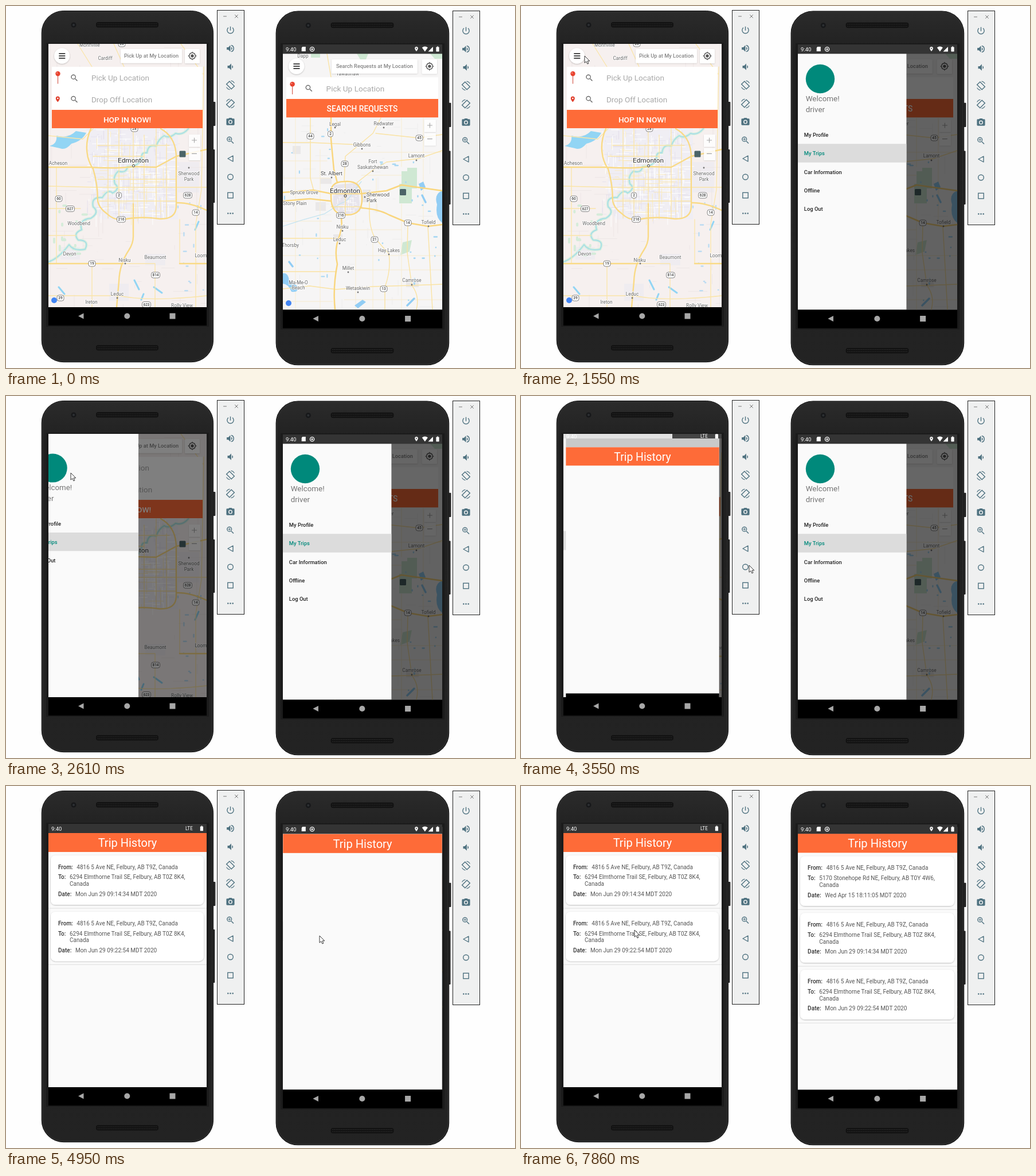
An HTML page for the animation above (7.99 s loop, 888 by 631 pixels).

```html
<!DOCTYPE html>
<html lang="en">
<head>
<meta charset="utf-8">
<title>Ride app: trip history</title>
<style>
html, body { margin: 0; width: 100%; height: 100%; overflow: hidden; background: #fefefe; }
svg { display: block; width: 888px; height: 631px; }
text { font-family: Roboto, "Open Sans", sans-serif; white-space: pre; }
.halo { paint-order: stroke; stroke: #fff; stroke-opacity: .8; stroke-width: 2px; stroke-linejoin: round; }
.road { fill: none; stroke-linejoin: round; stroke-linecap: round; }
</style>
</head>
<body>
<svg id="stage" viewBox="0 0 888 631" xmlns="http://www.w3.org/2000/svg"></svg>
<script>
const ORANGE = '#fe6b38', TEAL = '#00897b', STEEL = '#4f7280';
const RIGHT = 'translate(408.44 .5) scale(1.0075)';
const UNDO_RIGHT = 'scale(.99256) translate(-408.44 -.5)';
const LOOP = 7990;

// ---------- drawing helpers ----------
const text = (x, y, s, size, fill, more = '') =>
  `<text x="${x}" y="${y}" font-size="${size}" fill="${fill}" ${more}>${s}</text>`;
const mid = 'text-anchor="middle"';
const rect = (x, y, w, h, fill, more = '') =>
  `<rect x="${x}" y="${y}" width="${w}" height="${h}" fill="${fill}" ${more}/>`;
const disc = (x, y, r, fill, more = '') => `<circle cx="${x}" cy="${y}" r="${r}" fill="${fill}" ${more}/>`;
const line = (d, color, w, more = '') =>
  `<path class="road" d="${d}" stroke="${color}" stroke-width="${w}" ${more}/>`;
const shape = (d, fill) => `<path d="${d}" fill="${fill}"/>`;
const icon = (name, x, y, size, fill) =>
  `<path transform="translate(${x - size / 2} ${y - size / 2}) scale(${size / 24})" d="${ICONS[name]}" fill="${fill}"/>`;

const ICONS = {
  power: 'M13 3h-2v10h2V3zm4.8 2.2l-1.4 1.4A7 7 0 1 1 7.6 6.6L6.2 5.2a9 9 0 1 0 11.6 0z',
  louder: 'M3 9v6h4l5 5V4L7 9H3zm13.5 3c0-1.8-1-3.3-2.5-4v8c1.5-.7 2.5-2.2 2.5-4zM14 3.2v2.1a7 7 0 0 1 0 13.4v2.1a9 9 0 0 0 0-17.6z',
  quieter: 'M18.5 12c0-1.8-1-3.3-2.5-4v8c1.5-.7 2.5-2.2 2.5-4zM5 9v6h4l5 5V4L9 9H5z',
  camera: 'M9 2L7.2 4H4a2 2 0 0 0-2 2v12a2 2 0 0 0 2 2h16a2 2 0 0 0 2-2V6a2 2 0 0 0-2-2h-3.2L15 2H9zm3 15a5 5 0 1 1 0-10 5 5 0 0 1 0 10zm0-2a3 3 0 1 0 0-6 3 3 0 0 0 0 6z',
  search: 'M15.5 14h-.8l-.3-.3A6.5 6.5 0 1 0 9.5 16c1.6 0 3.1-.6 4.2-1.6l.3.3v.8l5 5 1.5-1.5-5-5zm-6 0a4.5 4.5 0 1 1 0-9 4.5 4.5 0 0 1 0 9z',
  target: 'M12 8a4 4 0 1 0 0 8 4 4 0 0 0 0-8zm8.9 3A9 9 0 0 0 13 3.1V1h-2v2.1A9 9 0 0 0 3.1 11H1v2h2.1a9 9 0 0 0 7.9 7.9V23h2v-2.1a9 9 0 0 0 7.9-7.9H23v-2h-2.1zM12 19a7 7 0 1 1 0-14 7 7 0 0 1 0 14z',
  place: 'M12 2a7 7 0 0 0-7 7c0 5.3 7 13 7 13s7-7.7 7-13a7 7 0 0 0-7-7zm0 9.5a2.5 2.5 0 1 1 0-5 2.5 2.5 0 0 1 0 5z'
};

const label = ([s, x, y, size = 8.3, color = '#696969']) =>
  text(x, y, s, size, color, `class="halo" ${mid}`);
const shield = ([s, x, y]) => {
  const w = 6 + s.length * 3;
  return rect(x - w / 2, y - 5, w, 10, '#fff', 'rx="3.5" stroke="#777" stroke-width=".9"') +
    text(x, y + 2.4, s, 6.5, '#444', `font-weight="500" ${mid}`);
};

// short random streets inside a box
function streets(x, y, w, h, count, longest, seed) {
  const rnd = () => (seed = seed * 16807 % 2147483647) / 2147483647;
  let d = '';
  for (let i = 0; i < count; i++)
    d += `M${(x + rnd() * w).toFixed(1)} ${(y + rnd() * h).toFixed(1)}${i % 2 ? 'h' : 'v'}${(rnd() * longest).toFixed(1)}`;
  return d;
}

// ---------- maps ----------
function cityMap() {
  const major = 'M148 214Q140 232 141 250Q142 270 152 284Q160 310 160 340Q162 352 176 362Q188 374 205 372Q235 366 268 371Q296 372 297 350V262Q296 228 270 214' +
    'M222 345V402Q222 414 214 426Q198 450 197 480L193 525M74 281H146Q190 284 222 280L262 281L297 262L350 250' +
    'M297 343Q320 342 350 356M74 449H204M303 449H350';
  const minor = 'M88 281V449M74 314L158 316H350M74 353H130M345 106L341 320L331 380V525M260 449V525M74 505H197M197 505Q250 516 350 505' +
    'M160 243H285M152 262H240M160 302H297M163 340H297M178 214V370M197 214V370M222 214V345M241 225V371M262 214V371M280 240V371' +
    'M125 66L150 106M188 66L206 106M152 214L134 232L74 226M305 66L345 120M150 449V525M303 372V449M74 400H122M204 449H260';
  const river = 'M318 214Q308 226 296 222Q284 232 276 226Q266 232 262 244Q248 240 246 256Q234 254 237 268Q226 282 212 280Q210 292 196 288Q186 296 190 310' +
    'Q200 318 186 326Q178 318 168 334Q148 332 152 350Q164 360 148 370Q126 372 132 390Q116 396 126 408Q146 408 138 424Q118 428 110 416Q92 440 74 446';
  return rect(74, 66, 276, 459, '#f6f0ef') +
    shape('M140 214H300V372H165Q148 340 152 300Z', '#f0eef4') +
    shape('M300 272H337V325H300ZM95 420h34v22h-34zM180 484h34v30h-34zM243 432h35v20h-35z', '#efecf0') +
    line(streets(76, 66, 270, 455, 80, 45, 11), '#ede6e6', .9) +
    line(streets(142, 214, 145, 150, 170, 26, 7), '#e2dfec', .8) +
    line(streets(142, 214, 145, 150, 170, 30, 23), '#fff', 1) +
    line(streets(150, 214, 140, 150, 50, 36, 57), '#fbecc0', 1) +
    line(river, '#dcefe0', 5) + line(streets(300, 335, 45, 180, 14, 6, 31), '#bcdcf2', 2.4) +
    line(streets(84, 340, 60, 100, 16, 8, 5), '#d5ecd9', 4) +
    line(river, '#a6dee6', 1.9) +
    shape('M76 244Q90 240 88 226Q108 232 122 218L140 221Q132 236 114 240Q104 252 94 248Z', '#92d5f4') +
    line('M224 478L232 494M258 490L272 500M92 490L102 502M336 376L330 390M240 502L236 512', '#92d5f4', 3) +
    line(minor, '#fae5a9', 1.3) + line(major, '#f9da86', 2.4) +
    rect(302.5, 252.5, 11, 11, '#4b6468', 'rx="1.5"') +
    [['Morinville', 146, 71], ['Cardiff', 173, 93.5], ['Acheson', 91, 276.5], ['Sherwood', 319, 295], ['Park', 319, 305],
      ['Woodbend', 127, 381.5], ['Devon', 111, 434.5], ['Nisku', 207, 445.5], ['Beaumont', 260.5, 440.5], ['Loom', 340, 437.5],
      ['Leduc', 194, 505], ['Ireton', 149, 518.5], ['Rolly View', 307, 524.5], ['Edmonton', 222, 272.5, 11.8, '#333']].map(label).join('') +
    disc(222.5, 278.5, 2, '#fff', 'stroke="#333"') + disc(319, 282, 1.4, '#777') + disc(208, 449, 1.4, '#777') + disc(194, 509, 1.4, '#777') +
    [['60', 92, 336], ['627', 112, 353.5], ['216', 201, 372], ['2', 197, 330], ['628', 317, 330], ['14', 331, 360], ['19', 150, 449],
      ['814', 261, 469], ['623', 245, 520.5], ['39', 95, 509], ['28', 224, 214], ['28', 202, 66]].map(shield).join('') +
    disc(84, 513, 5, '#4285f4');
}

function regionMap() {
  const major = 'M567 330Q564 306 590 306Q621 303 621 335Q622 364 596 364Q566 366 567 330Z' +
    'M483 325L536 321L567 327H621L664 322L690 312L761 322M483 340L530 336L567 340M567 195V232L572 285L578 308' +
    'M584 364Q588 382 582 400Q572 424 578 450Q570 490 574 529M620 352Q650 354 668 364L701 378L736 384L761 381';
  const minor = 'M590 306L592 262L640 222L654 195M612 308L640 286L664 272L720 266L761 252M634 322V362Q634 385 643 404L668 432Q672 460 661 490V529' +
    'M483 405H582M483 493L530 488L576 494L640 489L708 487L761 485M531 195V300L538 326M708 487Q722 505 716 529M708 487L700 430L701 378' +
    'M483 238H531L620 242M645 222L720 230L761 224M592 306V364M567 350H621M483 463H577M736 384L744 529M560 83L567 124';
  const thin = 'M505 195V529M548 250V529M610 364V529M640 404V529M690 195V280M690 345V529M728 195V380M483 270H560M600 255H761' +
    'M483 300H565M620 295H690M483 375H568M600 390H690M483 435H761M590 460H761M590 512H761M483 515H570M646 300V360';
  return rect(483, 83, 278, 447, '#f6f5f5') +
    shape('M572 312L614 308L618 358L590 364L570 352Z', '#e8e5ec') +
    shape('M540 342h18v15h-18zM622 320h14v22h-14zM548 300h20v10h-20zM500 244h14v14h-14zM571 398h16v12h-16zM698 478h22v12h-22z', '#eae8e8') +
    shape('M690 288H700V282H717V318H708V344H686V310H690ZM692 412L708 408L704 428L688 434ZM532 83H548V90H532ZM612 83H632L628 93H618ZM740 83H761V92H748Z', '#cfe8d3') +
    line(thin, '#f7ecd0', 1) + line(streets(484, 195, 265, 330, 55, 30, 17), '#ededec', .9) +
    line(streets(573, 312, 40, 45, 40, 12, 9), '#fff', .9) +
    line(streets(640, 270, 110, 250, 22, 5, 77), '#a9d8f3', 2.6) + line(streets(486, 210, 80, 310, 14, 5, 41), '#a9d8f3', 2.2) +
    line('M620 306L604 326Q598 340 584 344Q572 352 556 362L520 372L483 384', '#c4e4f0', 1.3) +
    shape('M761 322Q746 328 752 346Q748 368 761 378ZM483 466Q492 464 494 478L508 488Q512 500 498 498Q492 484 483 484ZM608 522L622 512L628 516L614 527ZM720 310l8-4 4 10-8 6z', '#92cdf4') +
    line('M700 522L712 510M726 330L732 342M500 454L494 446', '#92cdf4', 3.4) +
    line(minor, '#fae3a3', 1.4) + line(major, '#f9d67e', 2.5) +
    rect(687, 319, 11, 11, '#4b6468', 'rx="1.5"') +
    [['Dapp', 518, 89.5], ['Tawatinaw', 596, 121], ['Legal', 574, 208.5], ['Redwater', 659, 207.5], ['Gibbons', 621, 244.5], ['Fort', 640, 274],
      ['Saskatchewan', 640, 283.5], ['Lamont', 716, 264], ['St. Albert', 568, 294.5, 9.2, '#444'], ['Edmonton', 591.5, 325.5, 11.6, '#333'],
      ['Spruce Grove', 520, 328], ['Stony Plain', 504, 347], ['Sherwood', 649, 332, 9, '#555'], ['Park', 638, 342, 9, '#555'], ['Nisku', 587, 388],
      ['Leduc', 582, 409.5], ['Tofield', 737, 379.5], ['Thorsby', 496, 420], ['Hay Lakes', 668, 429], ['Millet', 597, 460],
      ['Ma-Me-O', 510, 485], ['Beach', 510, 494], ['Wetaskiwin', 614, 495], ['Camrose', 708, 481]].map(label).join('') +
    disc(592, 331, 2, '#fff', 'stroke="#333"') +
    [[574, 212], [659, 212], [621, 249], [640, 288], [716, 269], [568, 299], [626, 333], [587, 392], [582, 414], [737, 384], [668, 433], [597, 464],
      [614, 499], [708, 486]].map(([x, y]) => disc(x, y, 1.4, '#777')).join('') +
    [['44', 531, 227], ['2', 566, 223], ['28', 591, 275], ['45', 721, 230], ['216', 584, 365], ['21', 643, 407], ['14', 701, 378], ['13', 659, 493]].map(shield).join('') +
    disc(493, 518, 5, '#4285f4');
}

// ---------- app screens ----------
function mapControls({ dy, dx, boxX, request, fields, action, actionY, zoomY }) {
  const y = 87 + dy, top = 75 + dy;
  const field = (s, fy) => icon('search', 119.3, fy, 16, '#666') + text(149, fy + 5, s, 13.5, '#a9a9a9');
  const py = 118 + dy;
  return rect(boxX, top, 307 - boxX, 24.5, '#fff', 'rx="1.5" filter="url(#faint)"') +
    text((boxX + 307) / 2, y + 3.2, request, 9.25, '#858585', `font-weight="500" ${mid}`) +
    rect(312 + dx, top, 26, 25, '#fff', 'rx="1.5" filter="url(#faint)"') + icon('target', 325 + dx, y, 16, '#555') +
    disc(97.6, y, 13.5, '#fff', 'filter="url(#soft)"') +
    line(`M92.3 ${y - 4}h11M92.3 ${y}h11M92.3 ${y + 4}h11`, '#111', 1.5, 'style="stroke-linecap:butt"') +
    rect(80, 106 + dy, 263, actionY - 106 - dy, '#fff') +
    line(`M90.5 ${py}v17`, '#d9695c', 1.3) + disc(90.5, py, 4.2, '#e8432f') + disc(89.2, py - 1.3, 1, '#f6a79c') +
    field('Pick Up Location', 125.3 + dy) +
    (fields > 1 ? icon('place', 90.3, 162.5, 12, '#e0402e') + field('Drop Off Location', 162.8) : '') +
    rect(80, actionY, 263, 32, ORANGE) +
    text(211.5, actionY + 21.7, action, 13.7, '#fff', `font-weight="500" ${mid}`) +
    [0, 1].map(i => rect(319, zoomY - 10 + i * 23.4, 20, 21.5, '#fff', 'opacity=".85" filter="url(#faint)"')).join('') +
    line(`M324.5 ${zoomY}h8M328.5 ${zoomY - 4}v8M324.5 ${zoomY + 23.4}h8`, '#a5a5a5', 1.1);
}

function drawer(user, items) {
  return rect(74, 66, 188, 459, '#fafafa') + disc(112.7, 125.6, 25, TEAL) +
    text(87.6, 164.4, 'Welcome!', 13.3, '#757575') + text(87.6, 182.8, user, 13.3, '#757575') +
    rect(74, 238, 188, 32.2, '#dcdcdc') +
    items.map((s, i) => text(84.8, 225.5 + i * 32.2, s, 9.3, i === 1 ? TEAL : '#222', 'font-weight="500"')).join('');
}

const HOME = '4816 5 Ave NE, Felbury, AB T9Z, Canada';
const TRAIL = '6294 Elmthorne Trail SE, Felbury, AB T0Z 8K4,';
const STONE = '5170 Stonehope Rd NE, Felbury, AB T0Y 4W6,';

function card([to, date], i) {
  const y = 121 + i * 98.2;
  const row = (name, x, dy, value) =>
    text(91, y + dy, name, 10, '#333', 'font-weight="500"') + text(x, y + dy, value, 10, '#555');
  return rect(78, y, 267, 86, '#fff', 'rx="8" filter="url(#soft)"') +
    row('From:', 123.3, 23.6, HOME) + row('To:', 111, 41.3, to) + text(111, y + 53, 'Canada', 10, '#555') +
    row('Date:', 121, 70.6, date) + rect(74, y + 91.6, 276, 1, '#dedede');
}

const battery = rect(338.8, 70.5, 5.2, 7.8, '#fff', 'rx=".6"') + rect(340.3, 69.4, 2.2, 1.2, '#fff');
const clock = text(79, 77.6, '9:40', 9.5, '#fff');
const network = text(313, 77.2, 'LTE', 8.2, '#fff');
const lteStatus = rect(74, 66, 276, 16, '#343434') + clock + network + battery;
const fullStatus = rect(74, 66, 276, 16.2, '#343434') + clock +
  shape('M108 70h5.5v8h-7v-6z', '#fff') +
  disc(124.7, 74.2, 3.6, 'none', 'stroke="#fff" stroke-width="1.3"') + disc(124.7, 74.2, 1.5, '#fff') +
  icon('place', 305.3, 74, 9.5, '#fff') + shape('M315 71.5Q320 67.5 325 71.5L320 78.5Z', '#fff') +
  shape('M334 70v8.4h-8.4z', '#fff') + `<g transform="translate(.6)">${battery}</g>`;

function tripsPage(trips, id) {
  return rect(74, 66, 276, 491, '#fafafa') + rect(74, 66, 276, 16, '#c9c9c9') + rect(74, 82, 276, 33, ORANGE) +
    text(212, 106, 'Trip History', 20, '#fff', mid) +
    `<g id="${id}Cards">${trips.map(card).join('')}</g>` + rect(74, 525, 276, 32, '#000');
}

function phone(id, place, { map, user, items, trips, status }) {
  const grill = y => rect(157, y, 109, 9.5, '#121212', 'rx="4"') +
    line(`M160 ${y + 3}H263M160 ${y + 6.5}H263`, '#2e2e2e', 1.2, 'stroke-dasharray="1 2"');
  return `<g transform="${place}">` +
    rect(360, 167, 5.4, 42, '#2a2a2a', 'rx="1"') + rect(359, 250, 5.4, 93, '#2a2a2a', 'rx="1"') +
    rect(62.2, 8.5, 299.4, 612.2, 'url(#shell)', 'rx="38" stroke="#161616"') +
    rect(64, 10.3, 295.8, 608.6, 'none', 'rx="36" stroke="#303030" stroke-width="1"') +
    rect(70, 64, 284, 495, '#1b1b1b') +
    disc(118, 33, 4.5, '#17181a') + disc(118, 33, 2, '#2d3033') + grill(28) + grill(591) +
    `<g clip-path="url(#screen)"><g id="${id}Old">${map}<rect id="${id}Dim" x="74" y="66" width="276" height="459"/>` +
    `<g id="${id}Drawer">${drawer(user, items)}</g></g><g id="${id}New">${tripsPage(trips, id)}</g>${status}</g>` +
    rect(74, 525, 276, 32, '#000') + shape('M126 540.5L135.5 535.5V545.5Z', '#a8a8a8') + disc(211.3, 540.5, 5, '#a8a8a8') +
    rect(285.5, 535.5, 10, 10, '#a8a8a8') + '</g>';
}

function toolbar(place) {
  const x = 391.5;
  const names = ['power', 'louder', 'quieter', '', '', 'camera', 'search'];
  const outline = `stroke="${STEEL}" stroke-width="1.4"`;
  const turn = (y, s) => `<g transform="translate(${x} ${y}) scale(${s} 1)">` +
    rect(-3.7, -6, 7.4, 12, 'none', `transform="rotate(-45)" ${outline}`) +
    line('M1.5 -7.6Q5 -7 6.6 -4M-1.5 7.6Q-5 7 -6.6 4', STEEL, 1.2) + '</g>';
  return `<g transform="${place}">` + rect(368.5, 7.5, 47, 373, '#eff0f0', 'stroke="#222"') +
    line('M379.5 18h5M399.5 15.5l5 5m0-5l-5 5', '#777', 1) +
    names.map((n, i) => n && icon(n, x, 42 + i * 32, 17, STEEL)).join('') + turn(138, 1) + turn(170, -1) +
    line('M387.8 232.2h4m-2-2v4', STEEL, 1) +
    line('M387 266L396 261V271Z', STEEL, 1.4) + disc(x, 298, 4.8, 'none', outline) +
    rect(386.8, 325.3, 9.4, 9.4, 'none', outline) +
    [-4.2, 0, 4.2].map(d => disc(x + d, 361.5, 1.3, STEEL)).join('') + '</g>';
}

const shadow = (id, opacity) => `<filter id="${id}" x="-20%" y="-20%" width="140%" height="150%">` +
  `<feDropShadow dx="0" dy=".8" stdDeviation=".9" flood-opacity="${opacity}"/></filter>`;

const JUNE = [[TRAIL, 'Mon Jun 29 09:14:34 MDT 2020'], [TRAIL, 'Mon Jun 29 09:22:54 MDT 2020']];
const openingStatus = `<g id="peek">${rect(74, 66, 190, 8, '#e2e2e2')}${rect(264, 66, 86, 8, '#444')}` +
  `<g clip-path="url(#strip)" transform="translate(0 -4)">${clock}${network}${battery}</g></g>` +
  `<g id="lte">${lteStatus}</g>`;

document.getElementById('stage').innerHTML = `<defs>
  <linearGradient id="shell" x2="0" y2="1"><stop stop-color="#2b2b2b"/><stop offset=".12" stop-color="#202020"/><stop offset="1" stop-color="#232323"/></linearGradient>
  ${shadow('soft', .28)}${shadow('faint', .16)}
  <clipPath id="screen">${rect(74, 66, 276, 459, '#000')}</clipPath>
  <clipPath id="strip">${rect(74, 70, 276, 8, '#000')}</clipPath></defs>` +
  toolbar('translate(0)') + toolbar('translate(411 1)') +
  phone('left', 'translate(0)', {
    map: cityMap() + mapControls({ dy: 0, dx: 0, boxX: 200, request: 'Pick Up at My Location', fields: 2, action: 'HOP IN NOW!', actionY: 181, zoomY: 234 }),
    user: 'rider', items: ['My Profile', 'My Trips', 'Log Out'], trips: JUNE, status: openingStatus
  }) +
  phone('right', RIGHT, {
    map: `<g transform="${UNDO_RIGHT}">${regionMap()}</g>` + mapControls({ dy: 16.8, dx: 3, boxX: 158.5, request: 'Search Requests at My Location', fields: 1, action: 'SEARCH REQUESTS', actionY: 160.3, zoomY: 206 }),
    user: 'driver', items: ['My Profile', 'My Trips', 'Car Information', 'Offline', 'Log Out'],
    trips: [[STONE, 'Wed Apr 15 18:11:05 MDT 2020'], ...JUNE], status: fullStatus
  }) +
  '<path id="cursor" d="M0 0V12.2L2.9 9.7L4.9 14L6.9 13.1L5 8.9H8.8Z" fill="#fff" stroke="#222" stroke-width=".9"/>';

// ---------- motion ----------
// bursts of screen updates: first, last, count
const bursts = [[130, 720, 6], [950, 1670, 7], [1790, 2030, 3], [2260, 2960, 7], [3070, 3780, 7], [3890, 4250, 4],
  [4480, 5170, 7], [5290, 6000, 7], [6130, 6820, 7], [6940, 7630, 7], [7750, 7860, 2]];
const ticks = [0];
for (const [a, b, n] of bursts)
  for (let i = 0; i < n; i++) ticks.push(Math.round(a + (b - a) * i / (n - 1)));

const pointer = [[130, 667, 367], [370, 592, 205], [610, 514, 92], [720, 508, 102], [1190, 508, 102], [1310, 400, 97], [1550, 111, 87],
  [1670, 91, 91], [1910, 78, 83], [2030, 75, 85], [2260, 80, 96], [2493, 109, 129], [2610, 113, 134], [2960, 108, 250], [3188, 108, 250],
  [3543, 398, 295], [3780, 601, 276], [3890, 590, 268], [4250, 547, 261], [4940, 547, 261], [5170, 562, 330], [5527, 653, 398],
  [5880, 543, 323], [6000, 570, 348], [6245, 534, 345], [6820, 172, 238], [7050, 142, 258], [7285, 240, 331], [7400, 289, 318],
  [7630, 165, 253], [7860, 198, 251]];
const rightDrawer = [[720, 0], [950, .1], [1070, .45], [1190, .8], [1310, .96], [1430, 1]];
const leftDrawer = [[2030, 0], [2260, .1], [2377, .3], [2493, .6], [2610, .837], [2727, .96], [2843, 1]];
const pageScale = [[0, .87], [115, .93], [233, .968], [350, .99], [465, .998], [560, 1]];
const pageAlpha = [[0, .04], [115, .7], [220, 1]];
const oldScale = [[0, 1.01], [233, 1.035], [465, 1.05]];

function at(keys, t, col = 1) {
  if (t <= keys[0][0]) return keys[0][col];
  for (let i = 1; i < keys.length; i++) {
    const [a, b] = [keys[i - 1], keys[i]];
    if (t <= b[0]) return a[col] + (b[col] - a[col]) * (t - a[0]) / (b[0] - a[0]);
  }
  return keys[keys.length - 1][col];
}

const el = id => document.getElementById(id);
const show = (id, on) => el(id).setAttribute('visibility', on ? 'visible' : 'hidden');
const move = (id, value) => el(id).setAttribute('transform', value);
const zoom = s => `translate(212 316) scale(${s}) translate(-212 -316)`;

function pose(id, open, since, loaded) {
  move(id + 'Drawer', `translate(${190 * (open - 1)})`);
  el(id + 'Dim').setAttribute('fill-opacity', .6 * open);
  move(id + 'Old', since < 0 ? '' : zoom(at(oldScale, since)));
  el(id + 'New').setAttribute('opacity', since < 0 ? 0 : at(pageAlpha, since));
  move(id + 'New', zoom(at(pageScale, since)));
  el(id + 'Cards').setAttribute('opacity', loaded ? 1 : 0);
}

function draw(time) {
  const t = ticks.filter(k => k <= time % LOOP).pop();
  pose('left', at(leftDrawer, t), t - 3307, t >= 4000);
  pose('right', at(rightDrawer, t), t - 4480, t >= 5050);
  show('peek', t >= 3400 && t < 3770);
  show('lte', t >= 3770);
  show('cursor', t >= 130);
  move('cursor', `translate(${at(pointer, t, 1)} ${at(pointer, t, 2)})`);
}

const start = performance.now();
function frame() {
  draw(performance.now() - start);
  requestAnimationFrame(frame);
}
draw(0);
requestAnimationFrame(frame);
</script>
</body>
</html>
```
